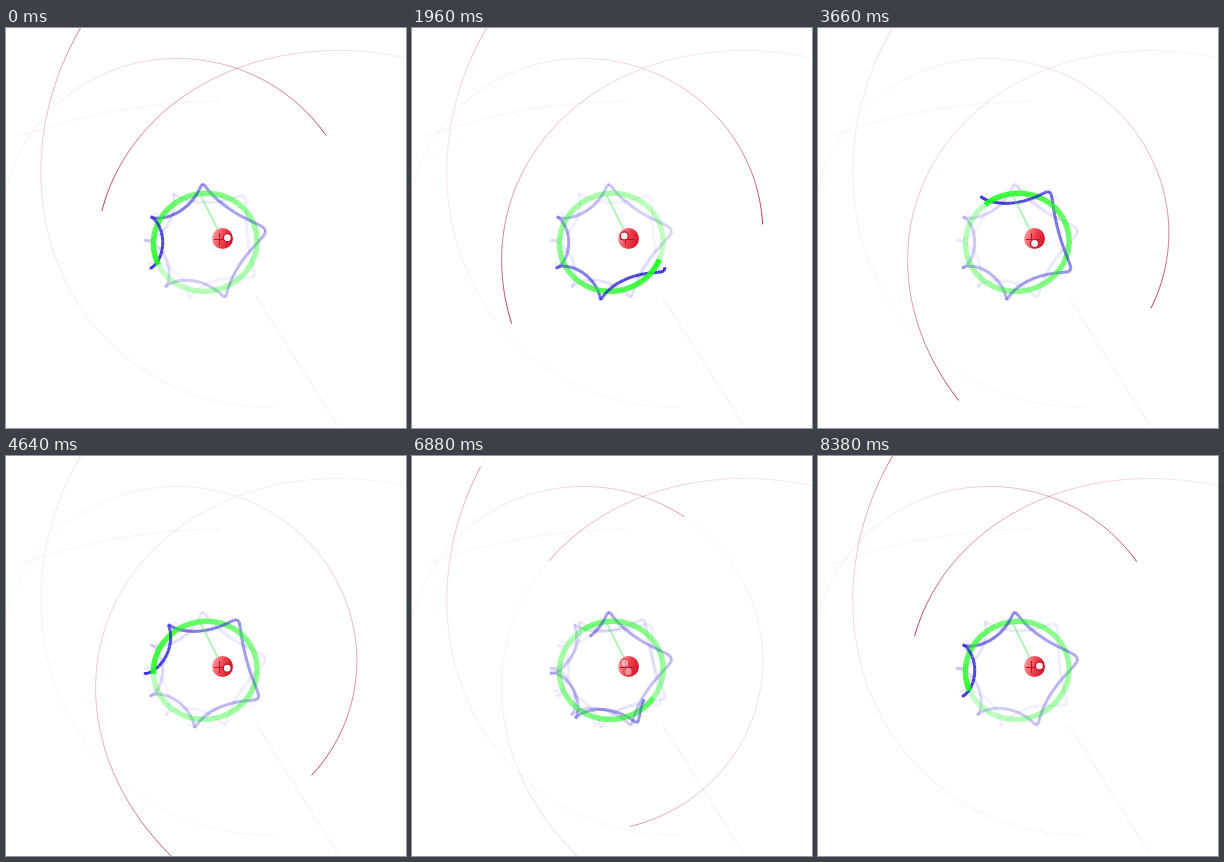
Write an HTML page with a canvas that moves like this. It is 400 by 400 pixels and loops after 8.48 s.

```html
<!DOCTYPE html>
<html>
<head>
<meta charset="utf-8">
<style>
html, body { margin: 0; height: 100%; overflow: hidden; background: #fff; }
canvas { display: block; }
</style>
</head>
<body>
<canvas id="stage" width="400" height="400"></canvas>
<script>
const ctx = document.getElementById('stage').getContext('2d');
const RAD = Math.PI / 180, LOOP = 8480, STEPS = 180, FADE_FROM = 120, START = -270, FADE = 57;
const sun = { x: 216.5, y: 210.5 };

// Kepler ellipse around the sun. a: half axis, e: eccentricity, tilt: direction of the
// nearest point, rate: mean degrees per step (negative is clockwise), near: step of closest approach
const orbit = ({ a, e, tilt, rate, near }) => t => {
  const mean = (t - near) * rate * RAD;
  let E = mean;
  for (let i = 0; i < 15; i++) E = mean + e * Math.sin(E);
  const x = a * (Math.cos(E) - e), y = a * Math.sqrt(1 - e * e) * Math.sin(E);
  const c = Math.cos(tilt * RAD), s = Math.sin(tilt * RAD);
  return { x: sun.x + x * c - y * s, y: sun.y - x * s - y * c };
};

const polar = (center, r, degrees) => ({
  x: center.x + r * Math.cos(degrees * RAD),
  y: center.y - r * Math.sin(degrees * RAD)
});

const planet = orbit({ a: 52, e: 0.34, tilt: 12.5, rate: 3.3, near: 49 });
const moon = t => polar(planet(t), 9.4, 203 - 14.7 * t);
const spot = t => polar(sun, 5, 10 + 3.3 * t);
const comets = [
  orbit({ a: 178, e: 0.248, tilt: -9.7, rate: -0.586, near: 57.7 }),
  orbit({ a: 274.6, e: 0.55, tilt: 162.3, rate: 0.318, near: -3.7 }),
  orbit({ a: 273.2, e: 0.44, tilt: 231.5, rate: -0.315, near: -202 })
];

const trail = (place, color, width, peak, floor) => {
  const points = [];
  for (let t = START; t <= STEPS; t++) points.push(place(t));
  return { points, color, width, peak, floor };
};
const trails = [
  ...comets.map(c => trail(c, '#aa0c28', 1, 0.85, 0.045)),
  trail(planet, '#1eff1e', 5.4, 0.96, 0.05),
  trail(moon, '#1e14cd', 3, 0.93, 0.02)
];

function line(a, b) {
  ctx.beginPath();
  ctx.moveTo(a.x, a.y);
  ctx.lineTo(b.x, b.y);
  ctx.stroke();
}

function drawTrails(now, weight) {
  for (let t = START + 1; t <= now; t++) {
    const glow = Math.exp((t - now) / FADE), i = t - START;
    for (const { points, color, width, peak, floor } of trails) {
      ctx.globalAlpha = weight * (floor + (peak - floor) * glow);
      ctx.strokeStyle = color;
      ctx.lineWidth = width;
      line(points[i - 1], points[i]);
    }
  }
}

function drawResidue() {
  ctx.globalAlpha = 0.03;
  ctx.strokeStyle = '#000';
  ctx.lineWidth = 1.5;
  line({ x: 250, y: 268 }, { x: 332, y: 398 });
  ctx.beginPath();
  ctx.moveTo(15, 108);
  ctx.quadraticCurveTo(110, 74, 215, 73);
  ctx.stroke();
}

function disc({ x, y }, r, fill) {
  ctx.beginPath();
  ctx.arc(x, y, r, 0, 2 * Math.PI);
  ctx.fillStyle = fill;
  ctx.fill();
}

function drawSun() {
  ctx.globalAlpha = 0.4;
  ctx.strokeStyle = '#3ce650';
  ctx.lineWidth = 2;
  line({ x: 195, y: 168 }, { x: 215, y: 208 });
  ctx.globalAlpha = 1;
  const shade = ctx.createLinearGradient(sun.x - 10, sun.y - 3, sun.x + 10, sun.y + 3);
  shade.addColorStop(0, '#ff9a9e');
  shade.addColorStop(0.5, '#f0404c');
  shade.addColorStop(1, '#d0142a');
  disc(sun, 10.5, shade);
  ctx.strokeStyle = '#b4142a';
  ctx.lineWidth = 1;
  line({ x: 208, y: 211.5 }, { x: 222, y: 211.5 });
  line({ x: 213.5, y: 205 }, { x: 213.5, y: 217 });
}

function drawSpot(now, weight) {
  ctx.globalAlpha = weight;
  disc(spot(now), 4, '#fff0f0');
  ctx.strokeStyle = '#b4142a';
  ctx.lineWidth = 1.2;
  ctx.stroke();
}

// The end of the loop dissolves into its beginning
function draw(step) {
  const mix = Math.max(0, (step - FADE_FROM) / (STEPS - FADE_FROM));
  const layers = [[step, 1 - mix], [step - STEPS, mix]].filter(l => l[1] > 0);
  ctx.globalAlpha = 1;
  ctx.fillStyle = '#fff';
  ctx.fillRect(0, 0, 400, 400);
  drawResidue();
  for (const [now, weight] of layers) drawTrails(now, weight);
  drawSun();
  for (const [now, weight] of layers) drawSpot(now, weight);
}

// Steps last 20, 100 and 20 ms in turn
function stepAt(ms) {
  const r = ms % 140;
  return Math.min(STEPS - 1, 3 * Math.floor(ms / 140) + (r >= 20) + (r >= 120));
}

const begin = performance.now();
let shown = -1;
function tick() {
  const step = stepAt((performance.now() - begin) % LOOP);
  if (step !== shown) draw(shown = step);
  requestAnimationFrame(tick);
}
tick();
</script>
</body>
</html>
```
